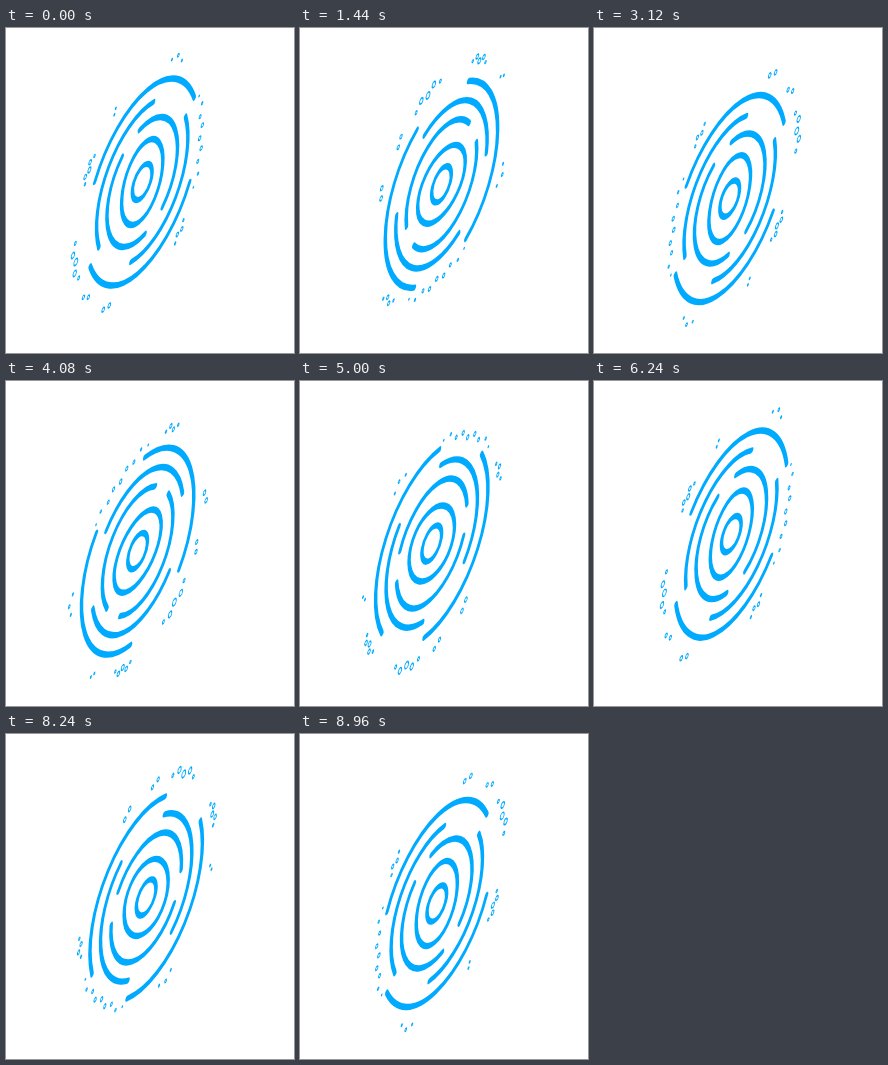
These frames come from a looping animation (288 px wide and 325 px high, 9 s). An HTML page:

```html
<!DOCTYPE html>
<html lang="en">
<head>
<meta charset="utf-8">
<title>Tilted portal</title>
<style>
  html, body { margin: 0; width: 100%; height: 100%; overflow: hidden; background: #fff; }
  svg { display: block; width: 288px; height: 325px; }
</style>
</head>
<body>
<svg viewBox="0 0 288 325">
  <g transform="matrix(.488 0 -.31 1.065 136.3 162)">
    <g id="portal" fill="none" stroke="#0af" stroke-width="6" stroke-linecap="round">
      <circle r="17"/>
      <ellipse rx="41.2" ry="35.6" transform="rotate(65)"/>
    </g>
  </g>
</svg>
<script>
const portal = document.getElementById('portal');
const rad = deg => deg * Math.PI / 180;
const polar = (r, deg) => [r * Math.cos(rad(deg)), r * Math.sin(rad(deg))];

function add(tag, attrs) {
  const el = document.createElementNS('http://www.w3.org/2000/svg', tag);
  for (const k in attrs) el.setAttribute(k, attrs[k]);
  portal.append(el);
}

// A broken ring: one arc, repeated half a turn on
function brokenRing(r, from, to) {
  for (const turn of [0, 180]) {
    add('path', { d: `M${polar(r, from + turn)}A${r} ${r} 0 0 1 ${polar(r, to + turn)}` });
  }
}
brokenRing(61, 53, 203);
brokenRing(79, 129, 252);
brokenRing(97.2, 0, 125.5);

// A zigzag chain of bubbles, largest in the middle; the orbit dips towards the rings near 330 degrees
function bubbleChain(start, count, step, size) {
  for (let i = 0; i < count; i++) {
    const angle = start + i * step;
    const dip = 16 * Math.max(0, Math.cos(rad(angle - 330))) ** 4;
    const [cx, cy] = polar(118 - dip + (i % 2 ? 2 : -2), angle);
    const r = size * Math.sin(Math.PI * (i + 1) / (count + 1));
    add('circle', { cx, cy, r, 'stroke-width': 1.6 });
  }
}
bubbleChain(18.5, 4, 3.5, 2.1);
bubbleChain(87, 2, 4.8, 2.6);
bubbleChain(111, 2, 4.5, 2.3);
bubbleChain(129, 5, 5.3, 3.4);
bubbleChain(179, 5, 3.3, 2.6);
bubbleChain(213, 2, 2.2, 1.1);
bubbleChain(264, 3, 5.2, 1.5);
bubbleChain(309, 9, 6.7, 2.1);

// One turn takes 6 s, then its last pose holds for one extra step
const STEP = 40, LOOP = 9000, TURN = 6000;

function draw() {
  const t = Math.floor(performance.now() % LOOP / STEP) * STEP;
  const angle = t % (TURN + STEP) / TURN * 360;
  portal.setAttribute('transform', `rotate(${angle}) translate(-4.9 -7.5)`);
  requestAnimationFrame(draw);
}
draw();
</script>
</body>
</html>
```
